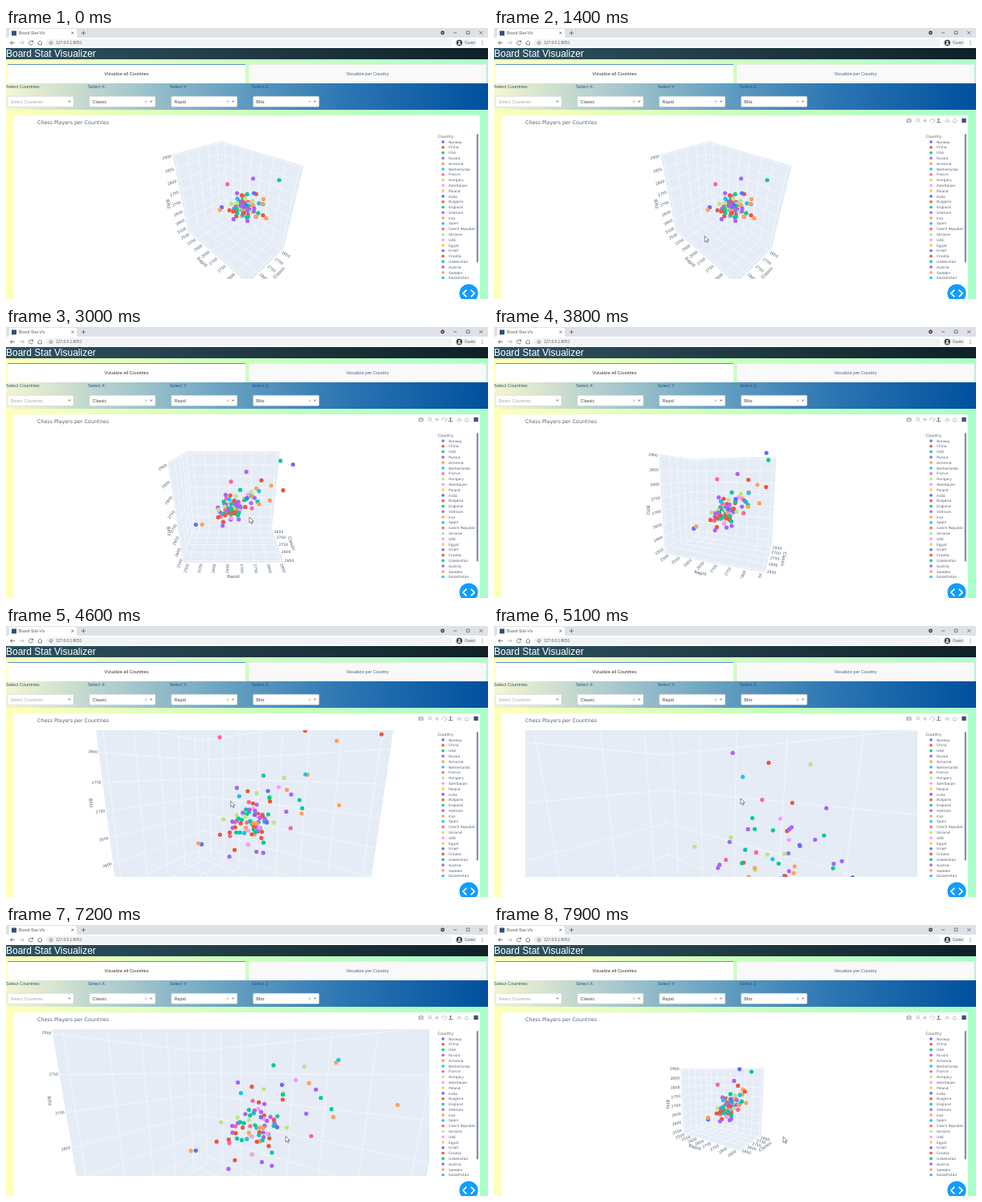
An HTML page with a canvas for the animation above (8 s loop, 600 by 338 pixels).

```html
<!DOCTYPE html>
<html lang="en">
<head>
<meta charset="utf-8">
<title>Board-Stat-Vis</title>
<style>
  html, body { margin: 0; width: 100%; height: 100%; overflow: hidden; background: #fff; }
  #stage { position: relative; width: 600px; height: 338px; overflow: hidden; }
  #stage > * { position: absolute; left: 0; top: 0; }
  #stage > #plot { left: 39px; top: 130px; width: 488px; height: 183px; }
  text { font-family: "Liberation Sans", Arial, sans-serif; }
  .dj text, text.dj { font-family: "DejaVu Sans", sans-serif; fill: #566276; }
  .icon { fill: none; stroke: #5f6368; stroke-width: .8; }
</style>
</head>
<body>
<div id="stage">
  <svg id="page" width="600" height="338" viewBox="0 0 600 338">
    <defs>
      <linearGradient id="body"><stop stop-color="#ffffba"/><stop offset=".5" stop-color="#ccffbe"/><stop offset="1" stop-color="#a9ffc9"/></linearGradient>
      <linearGradient id="head"><stop stop-color="#2c5364"/><stop offset=".5" stop-color="#203a43"/><stop offset="1" stop-color="#0f2027"/></linearGradient>
      <linearGradient id="band"><stop stop-color="#f5f6d0"/><stop offset=".2" stop-color="#b8d2cf"/><stop offset=".45" stop-color="#6aa3c2"/><stop offset=".7" stop-color="#2c76b3"/><stop offset="1" stop-color="#00509e"/></linearGradient>
      <clipPath id="legendBox"><rect x="530" y="130" width="60" height="183"/></clipPath>
    </defs>

    <!-- browser bars -->
    <rect width="600" height="12" fill="#dee1e6"/>
    <path d="M2 12Q4 12 4 9V3Q4 1 6 1H86Q88 1 88 3V9Q88 12 90 12Z" fill="#fff"/>
    <rect x="7" y="3.5" width="6" height="6" fill="#34507a"/>
    <text x="16" y="8.2" font-size="5" fill="#5a5e63">Board-Stat-Vis</text>
    <path class="icon" d="M81.3 4.7l3 3m0-3l-3 3M94 6.2h5m-2.5-2.5v5M557 6h4M573.3 4h3.6v3.6h-3.6zM589.3 4l4 4m0-4l-4 4"/>
    <circle cx="543.5" cy="6" r="2.4" fill="#3c4043"/><path d="M542.3 5.4h2.4l-1.2 1.5z" fill="#fff"/>
    <rect y="12" width="600" height="13" fill="#fff"/>
    <rect x="49" y="13.7" width="507" height="9.8" rx="4.9" fill="#f1f3f4"/>
    <path class="icon" d="M10.8 18.5H5.5m2.3-2.4l-2.4 2.4 2.4 2.4M33.2 17.2a2.5 2.5 0 1 0 .2 2M33.5 15.4v2h-2M39.6 18.5l2.7-2.5 2.7 2.5M40.3 18.2v2.7h4v-2.7"/>
    <path class="icon" style="stroke:#b4b7ba" d="M17 18.5h5.3m-2.3-2.4l2.4 2.4-2.4 2.4"/>
    <circle class="icon" cx="56" cy="18.5" r="2" style="stroke-width:.6"/><path class="icon" d="M56 18.2v1.4"/>
    <text x="62" y="20.4" font-size="4.85" fill="#5a5e63">127.0.0.1:8051</text>
    <rect x="558" y="13.7" width="28" height="9.8" rx="4.9" fill="#f1f3f4"/>
    <circle cx="564.3" cy="18.5" r="3.7" fill="#3c4043"/><circle cx="564.3" cy="17.4" r="1.2" fill="#fff"/><path d="M562 20.8a2.3 1.7 0 0 1 4.6 0z" fill="#fff"/>
    <text x="571" y="20.3" font-size="4.8" fill="#5a5e63">Guest</text>
    <g fill="#5f6368"><circle cx="593" cy="16.3" r=".6"/><circle cx="593" cy="18.5" r=".6"/><circle cx="593" cy="20.7" r=".6"/></g>

    <!-- page -->
    <rect y="25" width="600" height="313" fill="url(#body)"/>
    <rect y="25" width="600" height="14" fill="url(#head)"/>
    <text x="0" y="36.2" font-size="12" fill="#fff">Board Stat Visualizer</text>
    <rect x="2" y="45" width="296" height="24" fill="#fff"/><rect x="2" y="45" width="296" height=".9" fill="#4a80d4"/>
    <rect x="302" y="45.2" width="296" height="23.8" fill="#f9f9f9" stroke="#d6d6d6" stroke-width=".4"/>
    <g font-size="5.6" text-anchor="middle">
      <text x="150" y="59" fill="#333">Vizualize all Countries</text>
      <text x="450" y="59" fill="#4a6088">Vizualize per Country</text>
    </g>
    <rect y="69" width="600" height="33" fill="url(#band)"/>
    <g id="controls"></g>
    <rect x="10" y="109" width="580" height="229" fill="#fff"/>
    <text class="dj" x="39" y="119.8" font-size="6.35">Chess Players per Countries</text>
    <g id="legend" class="dj" clip-path="url(#legendBox)"></g>
    <rect x="585.8" y="132" width="2" height="160.5" rx="1" fill="#75859f"/>

    <g id="modebar">
      <g fill="none" stroke="#b3b9c3" stroke-width=".9">
        <path d="M513.8 113.8h1.4l.5-.8h1.6l.5.8h1.4v3.8h-5.4z" fill="#b3b9c3"/><circle cx="516.5" cy="115.6" r="1" stroke="#fff"/>
        <circle cx="527.6" cy="115" r="1.8"/><path d="M529 116.4l1.8 1.8M533.7 115.6h5.2M536.3 113v5.2M543 117a2 2 0 1 1 3.6-2.4M547 113a2 2 0 0 1-1.4 4.4"/>
        <path d="M562 117.8v-2.2l2.3-2 2.3 2v2.2M564.3 118v-3M571 116.5v-1l2.3-1.8 2.6 1.8v1M571 117.6h5"/>
      </g>
      <path d="M553.4 112.8v4.6M551 117.6h5M552 114h2.8" fill="none" stroke="#747c8a"/>
      <rect x="582.3" y="112.7" width="5.4" height="5.4" fill="#3f4f75"/>
    </g>
  </svg>

  <canvas id="plot"></canvas>

  <svg width="600" height="338" viewBox="0 0 600 338">
    <circle cx="576" cy="331" r="11.6" fill="#119dff"/>
    <path d="M573.3 326.6l-4.4 4.4 4.4 4.4M578.7 326.6l4.4 4.4-4.4 4.4" fill="none" stroke="#fff" stroke-width="1.7"/>
    <path id="cursor" d="M0 0V7.4L1.7 5.8 2.9 8.4 4.1 7.9 3 5.3H5.3Z" fill="#fff" stroke="#444" stroke-width=".6"/>
  </svg>
</div>

<script>
const $ = id => document.getElementById(id);
const COLORS = ['#636efa', '#ef553b', '#00cc96', '#ab63fa', '#ffa15a', '#19c3f3', '#ff6692', '#b6e880', '#ff97ff', '#fecb52'];
const COUNTRIES = 'Norway,China,USA,Russia,Armenia,Netherlands,France,Hungary,Azerbaijan,Poland,India,Bulgaria,England,Vietnam,Iran,Spain,Czech Republic,Ukraine,UAE,Egypt,Israel,Croatia,Uzbekistan,Austria,Sweden,Kazakhstan'.split(',');

$('controls').innerHTML = ['Countries', 'X', 'Y', 'Z'].map((label, i) => {
  const x = 2 + i * 101.9, value = ['Select Countries', 'Classic', 'Rapid', 'Blitz'][i];
  return `
    <text x="${x - 2}" y="75.3" font-size="5.6" fill="#285684">Select ${label}:</text>
    <rect x="${x}" y="85.3" width="82" height="13" rx="1.2" fill="#fff" stroke="#ccc" stroke-width=".5"/>
    <text x="${x + 3.6}" y="93.8" font-size="5.5" fill="${i ? '#444' : '#aaa'}">${value}</text>
    ${i ? `<path d="M${x + 69} 90.5l2.4 2.4m0-2.4l-2.4 2.4" stroke="#999" stroke-width=".6"/>` : ''}
    <path d="M${x + 74.8} 90.8h4l-2 2.2z" fill="#999"/>`;
}).join('');

$('legend').innerHTML = '<text x="537.5" y="137" font-size="4.9">Country</text>' + COUNTRIES.map((name, i) => {
  const y = 142 + i * 6.79;
  return `<circle cx="544" cy="${y}" r="1.8" fill="${COLORS[i % 10]}"/><text x="551" y="${y + 1.6}" font-size="4.4">${name}</text>`;
}).join('');

// Scene: x Classic, y Rapid, z Blitz, centred and scaled to equal volume
const W = 488, H = 183, FOCAL = H / 2 / Math.tan(Math.PI / 8), NEAR = .02, UNIT = 325;
function axis(name, lo, hi) {
  const ticks = [];
  for (let v = Math.ceil(lo / 50) * 50; v <= hi; v += 50) ticks.push([v, (v - (lo + hi) / 2) / UNIT]);
  return { name, ticks, half: (hi - lo) / 2 / UNIT };
}
const AXES = [axis('Classic', 2625, 2860), axis('Rapid', 2478, 2862), axis('Blitz', 2528, 2906)];
const HALF = AXES.map(a => a.half);
const dot = (a, b) => a[0] * b[0] + a[1] * b[1] + a[2] * b[2];

function camera(az, el, dist) {
  const k = Math.PI / 180, c = Math.cos(az * k), s = Math.sin(az * k), ce = Math.cos(el * k), se = Math.sin(el * k);
  const right = [-s, c, 0], up = [-se * c, -se * s, ce], back = [ce * c, ce * s, se];
  return p => [dot(p, right), dot(p, up), dist - dot(p, back)];
}
const flat = ([r, u, d]) => [W / 2 + FOCAL * r / d, H / 2 - FOCAL * u / d];

// the players far from the crowd: x, y, z, colour
const OUTLIERS = [
  [.33, .55, .555, 0], [-.05, .53, .52, 2], [.155, .54, .24, 1], [.03, .434, .253, 4],
  [-.15, .157, .368, 3], [.066, -.027, .31, 6], [-.28, -.55, -.45, 0], [-.14, -.43, -.365, 4]
];

// the crowd: three linked ratings with a tail towards the top
function makePoints(count) {
  const pts = OUTLIERS.map(p => ({ p, c: p[3] }));
  let seed = 11;
  const rnd = () => (seed = seed * 16807 % 2147483647) / 2147483647;
  const noise = () => (rnd() + rnd() + rnd() + rnd() - 2) * 1.73;
  const mix = '0331235724671283';
  while (pts.length < count) {
    const g = Math.min(2.2, -Math.log(rnd()) - 1);
    const p = [
      Math.max(-.34, -.18 + .06 * g + .06 * noise()),
      .03 + .14 * g + .1 * noise(),
      -.1 + .15 * g + .075 * noise()
    ];
    pts.push({ p, c: +mix[Math.floor(rnd() * mix.length)] });
  }
  return pts;
}
const POINTS = makePoints(98);

const cv = $('plot'), ctx = cv.getContext('2d'), ratio = Math.max(1, window.devicePixelRatio || 1);
cv.width = W * ratio;
cv.height = H * ratio;

// path of a polygon or line, cut at the near plane
function trace(view, pts, closed) {
  const v = pts.map(view), out = [];
  v.forEach((a, i) => {
    if (a[2] >= NEAR) out.push(a);
    if (!closed && i === v.length - 1) return;
    const b = v[(i + 1) % v.length];
    if ((a[2] < NEAR) !== (b[2] < NEAR)) {
      const k = (NEAR - a[2]) / (b[2] - a[2]);
      out.push(a.map((q, j) => q + k * (b[j] - q)));
    }
  });
  out.map(flat).forEach(([x, y], i) => i ? ctx.lineTo(x, y) : ctx.moveTo(x, y));
}

function at(i, vi, j, vj, k, vk) {
  const p = [];
  p[i] = vi; p[j] = vj; p[k] = vk;
  return p;
}

// text set off an edge along axis `out`, turned along axis `along`
function write(view, str, p, out, gap, size, along, maxTurn) {
  const step = axis => view(p.map((q, i) => i === axis ? q + .05 : q));
  const v = view(p), w = step(out);
  if (v[2] < .1 || w[2] < .1) return;
  const a = flat(v), b = flat(w), e = flat(step(along));
  const dir = Math.atan2(b[1] - a[1], b[0] - a[0]);
  let turn = Math.atan2(e[1] - a[1], e[0] - a[0]);
  while (turn > maxTurn) turn -= Math.PI;
  while (turn <= maxTurn - Math.PI) turn += Math.PI;
  ctx.save();
  ctx.translate(a[0] + Math.cos(dir) * gap, a[1] + Math.sin(dir) * gap);
  ctx.rotate(turn);
  ctx.font = size + 'px "DejaVu Sans", sans-serif';
  ctx.fillText(str, 0, 0);
  ctx.restore();
}

function drawScene(az, el, dist) {
  const view = camera(az, el, dist);
  ctx.setTransform(ratio, 0, 0, ratio, 0, 0);
  ctx.fillStyle = '#fff';
  ctx.fillRect(0, 0, W, H);

  for (let i = 0; i < 3; i++) {
    const j = (i + 1) % 3, k = (i + 2) % 3, wall = -HALF[i], hj = HALF[j], hk = HALF[k];
    ctx.beginPath();
    trace(view, [[-hj, -hk], [hj, -hk], [hj, hk], [-hj, hk]].map(([a, b]) => at(i, wall, j, a, k, b)), true);
    ctx.fillStyle = '#e5ecf6';
    ctx.fill();
    ctx.beginPath();
    for (const [, q] of AXES[j].ticks) trace(view, [at(i, wall, j, q, k, -hk), at(i, wall, j, q, k, hk)]);
    for (const [, q] of AXES[k].ticks) trace(view, [at(i, wall, j, -hj, k, q), at(i, wall, j, hj, k, q)]);
    ctx.strokeStyle = 'rgba(255,255,255,.8)';
    ctx.lineWidth = .6;
    ctx.stroke();
  }

  const dots = POINTS.map(({ p, c }) => ({ v: view(p), c })).filter(d => d.v[2] > NEAR).sort((a, b) => b.v[2] - a.v[2]);
  for (const { v, c } of dots) {
    const [x, y] = flat(v);
    ctx.beginPath();
    ctx.arc(x, y, 2.6, 0, 7);
    ctx.fillStyle = COLORS[c];
    ctx.fill();
  }

  ctx.fillStyle = '#4a576c';
  ctx.textAlign = 'center';
  ctx.textBaseline = 'middle';
  const [hx, hy, hz] = HALF;
  const edges = [[q => [q, hy, -hz], 1], [q => [hx, q, -hz], 0], [q => [hx, -hy, q], 0]];
  edges.forEach(([edge, out], i) => {
    for (const [v, q] of AXES[i].ticks) write(view, v, edge(q), out, 7.5, 4.6, out, Math.PI / 2);
    write(view, AXES[i].name, edge(0), out, 18, 5.4, i, 1.95);
  });
}

const lerp = (a, b, k) => a + (b - a) * k;
const ramp = (t, from, to) => Math.min(1, Math.max(0, (t - from) / (to - from)));

// two drags turn the scene, then the wheel zooms in and out again
function pose(t) {
  const first = ramp(t, 2100, 3000);
  return [
    45 * (1 - first) + 37 * ramp(t, 3000, 4450),
    35.3 - 11 * first - 14.3 * ramp(t, 3000, 3800),
    2.165 * Math.pow(.07, ramp(t, 4400, 5000)) * Math.pow(20, ramp(t, 6700, 7725))
  ];
}

// time, x, y
const STOPS = [
  [500, 150, 337], [1300, 263, 262], [2000, 258, 244], [3000, 303, 237], [4450, 266, 220],
  [4900, 307, 215], [5800, 307, 215], [6400, 329, 262], [7700, 360, 264]
];
function pointer(t) {
  const n = STOPS.findIndex(s => s[0] > t), i = n < 0 ? STOPS.length - 1 : Math.max(1, n);
  const [ta, xa, ya] = STOPS[i - 1], [tb, xb, yb] = STOPS[i], k = ramp(t, ta, tb);
  return `translate(${lerp(xa, xb, k)} ${lerp(ya, yb, k)})`;
}

function frame(now) {
  const t = now % 8000;
  drawScene(...pose(t));
  $('cursor').setAttribute('transform', pointer(t));
  $('cursor').style.visibility = $('modebar').style.visibility = t >= STOPS[0][0] ? 'visible' : 'hidden';
  requestAnimationFrame(frame);
}
requestAnimationFrame(frame);
</script>
</body>
</html>
```
